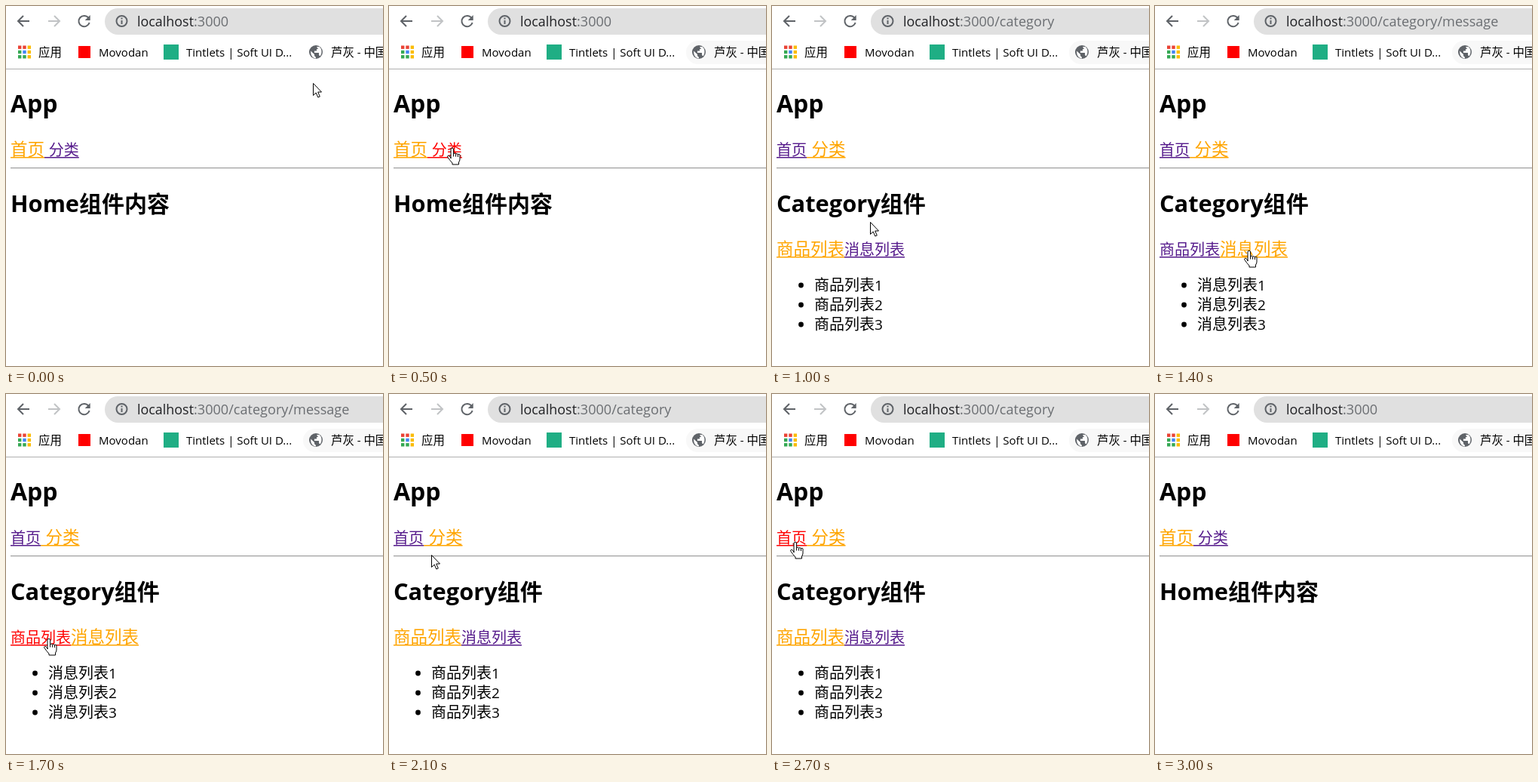
Write an HTML page that moves like this. It is 500 px wide and 477 px high and loops after 3.6 s.

```html
<!DOCTYPE html>
<html lang="zh-CN">
<head>
<meta charset="utf-8">
<title>Router links</title>
<style>
  html, body { margin: 0; width: 100%; height: 100%; overflow: hidden; background: #fff; }
  svg { display: block; width: 100vw; height: 100vh; }
  text { font-family: 'Open Sans', 'Noto Sans CJK SC', 'Noto Sans CJK', sans-serif; white-space: pre; }
  .head { font-weight: 700; }
  .mark { font-size: 15px; }
  .mark tspan { font-size: 15.4px; }
  .icon { fill: none; stroke: #5f6368; stroke-width: 2; }
</style>
</head>
<body>
<svg viewBox="0 0 500 477" xmlns="http://www.w3.org/2000/svg">
  <rect width="500" height="477" fill="#fff"/>

  <!-- toolbar -->
  <path class="icon" d="M31 20H16.5M23 13l-7 7 7 7"/>
  <path class="icon" style="stroke:#c1c3c5" d="M56 20h14.5M64 13l7 7-7 7"/>
  <path class="icon" d="M109.3 15.6A7.2 7.2 0 1 0 110.6 22"/>
  <path fill="#5f6368" d="M111.7 12v7h-7z"/>
  <rect x="131" y="3" width="400" height="35" rx="17.5" fill="#e0e0e0"/>
  <circle class="icon" cx="153.5" cy="20" r="7"/>
  <path class="icon" d="M153.5 19v5M153.5 15.5v2"/>
  <text y="27" font-size="17.9"><tspan x="174" fill="#202124">localhost</tspan><tspan id="path" x="249" font-size="18.1" fill="#6b6e72"></tspan></text>

  <!-- bookmarks -->
  <rect id="pill" x="394" y="46" width="140" height="31" rx="15.5" fill="#f8f8f8"/>
  <g id="apps"></g>
  <text class="mark" x="43" y="67"><tspan>应用</tspan></text>
  <rect x="96" y="53" width="16" height="16" fill="#f00"/>
  <text class="mark" x="123" y="67">Movodan</text>
  <rect x="209" y="51" width="20" height="20" fill="#1fae84"/>
  <text class="mark" x="239" y="67">Tintlets | Soft UI D...</text>
  <circle cx="411" cy="61" r="9" fill="#5f6368"/>
  <path fill="#fff" d="M404 59.5l5 4.5v2l2 2v1.5q-7-1-7-10zM412 54h3.5q3 2 3 7 0 3-2 5.5l-1.5-1.5v-3h-6v-2.5h3v-2.5h2z"/>
  <text class="mark" x="431" y="67"><tspan>芦灰</tspan> - <tspan>中国</tspan></text>
  <rect y="83" width="500" height="1" fill="#b0b0b0"/>

  <!-- page -->
  <text class="head" x="6" y="141" font-size="32">App</text>
  <rect x="6" y="214" width="494" height="1" fill="#9a9a9a"/>
  <rect x="6" y="215" width="494" height="1" fill="#eee"/>
  <g id="page"></g>

  <g id="cursor" fill="#fff" stroke="#000" stroke-linejoin="round">
    <path id="arrow" d="M.5 .5V16.5L4.2 13 6.8 19 9.3 18 6.7 12H11.5Z"/>
    <g id="hand">
      <path d="M5 14V2a1.8 1.8 0 0 1 3.6 0V8a1.6 1.6 0 0 1 3 .4 1.5 1.5 0 0 1 2.8 .6 1.4 1.4 0 0 1 2.6 1V15q0 2-1.5 4V22H7V20Q4 17 1 12.5 0 10.6 1.4 10.2 3 10 5 13Z"/>
      <path fill="none" d="M8.6 8v3.5M11.6 8.4v3.3M14.4 9v3"/>
    </g>
  </g>
</svg>
<script>
const $ = id => document.getElementById(id);
const LOOP = 3600, STEP = 100;
const PURPLE = '#551a8b', ORANGE = '#ffa500', RED = '#f00';

// time, left, top, pointing hand?
const moves = [
  [0, 407, 102], [100, 204, 156], [200, 134, 177], [300, 107, 183], [400, 77, 188, 1],
  [800, 95, 212], [900, 121, 243], [1000, 130, 286], [1100, 121, 314, 1],
  [1200, 119, 320, 1], [1300, 118, 324, 1],
  [1500, 100, 324, 1], [1600, 77, 324, 1], [1700, 50, 324, 1],
  [1900, 61, 294], [2000, 63, 243], [2100, 56, 213], [2200, 43, 203],
  [2300, 28, 198, 1], [2400, 24, 196, 1], [2900, 134, 177]
];
const HIDE = 3000;

// time, page, hovered link
const states = [
  [0, 'home', ''], [500, 'home', '分类'], [600, 'goods', ''],
  [1200, 'goods', '消息列表'], [1400, 'message', ''],
  [1600, 'message', '商品列表'], [1800, 'goods', ''],
  [2600, 'goods', '首页'], [2800, 'home', '']
];
const paths = { home: ':3000', goods: ':3000/category', message: ':3000/category/message' };

const at = (list, t) => list.filter(k => k[0] <= t).pop();

// A row of links laid end to end; a leading space belongs to its link.
function row(y, links, hover) {
  let x = 6;
  return links.map(([label, active]) => {
    const word = label.trim(), size = active ? 22.5 : 20;
    const color = active ? ORANGE : word === hover ? RED : PURPLE;
    const gap = word === label ? 0 : size * 0.29;
    const width = gap + word.length * size;
    const svg = `<text x="${x + gap}" y="${y}" font-size="${size}" fill="${color}">${word}</text>` +
      `<rect x="${x}" y="${y + 2}" width="${width}" height="1.5" fill="${color}"/>`;
    x += width;
    return svg;
  }).join('');
}

const heading = (latin, hanzi) =>
  `<text class="head" x="6" y="273" font-size="30.8">${latin}<tspan font-size="30">${hanzi}</tspan></text>`;

const items = name => [1, 2, 3].map(n => {
  const y = 351 + n * 26;
  return `<circle cx="38.5" cy="${y - 7}" r="3.4"/>` +
    `<text x="56" y="${y}" font-size="20">${name}<tspan font-size="19">${n}</tspan></text>`;
}).join('');

function drawPage(page, hover) {
  const home = page === 'home', goods = page === 'goods';
  $('path').textContent = paths[page];
  let svg = row(198, [['首页', home], [' 分类', !home]], hover);
  if (home) svg += heading('Home', '组件内容');
  else svg += heading('Category', '组件') +
    row(330, [['商品列表', goods], ['消息列表', !goods]], hover) +
    items(goods ? '商品列表' : '消息列表');
  $('page').innerHTML = svg;
}

const red = '#ea4335', yellow = '#fbbc04', green = '#34a853', blue = '#4285f4';
$('apps').innerHTML = [red, red, yellow, green, blue, yellow, green, green, yellow]
  .map((c, i) => `<rect x="${16 + i % 3 * 6.3}" y="${52.5 + Math.floor(i / 3) * 6.3}" width="4.4" height="4.4" fill="${c}"/>`)
  .join('');

const show = (id, on) => $(id).setAttribute('visibility', on ? 'visible' : 'hidden');
let shown = null;

function render(ms) {
  const t = Math.floor(ms % LOOP / STEP) * STEP;
  const state = at(states, t);
  if (state !== shown) drawPage(state[1], state[2]);
  shown = state;
  const [, x, y, hand] = at(moves, t);
  $('cursor').setAttribute('transform', `translate(${x} ${y})`);
  show('arrow', t < HIDE && !hand);
  show('hand', t < HIDE && hand);
  show('pill', t >= STEP);
}

const start = performance.now();
function tick() {
  render(performance.now() - start);
  requestAnimationFrame(tick);
}
tick();
</script>
</body>
</html>
```
